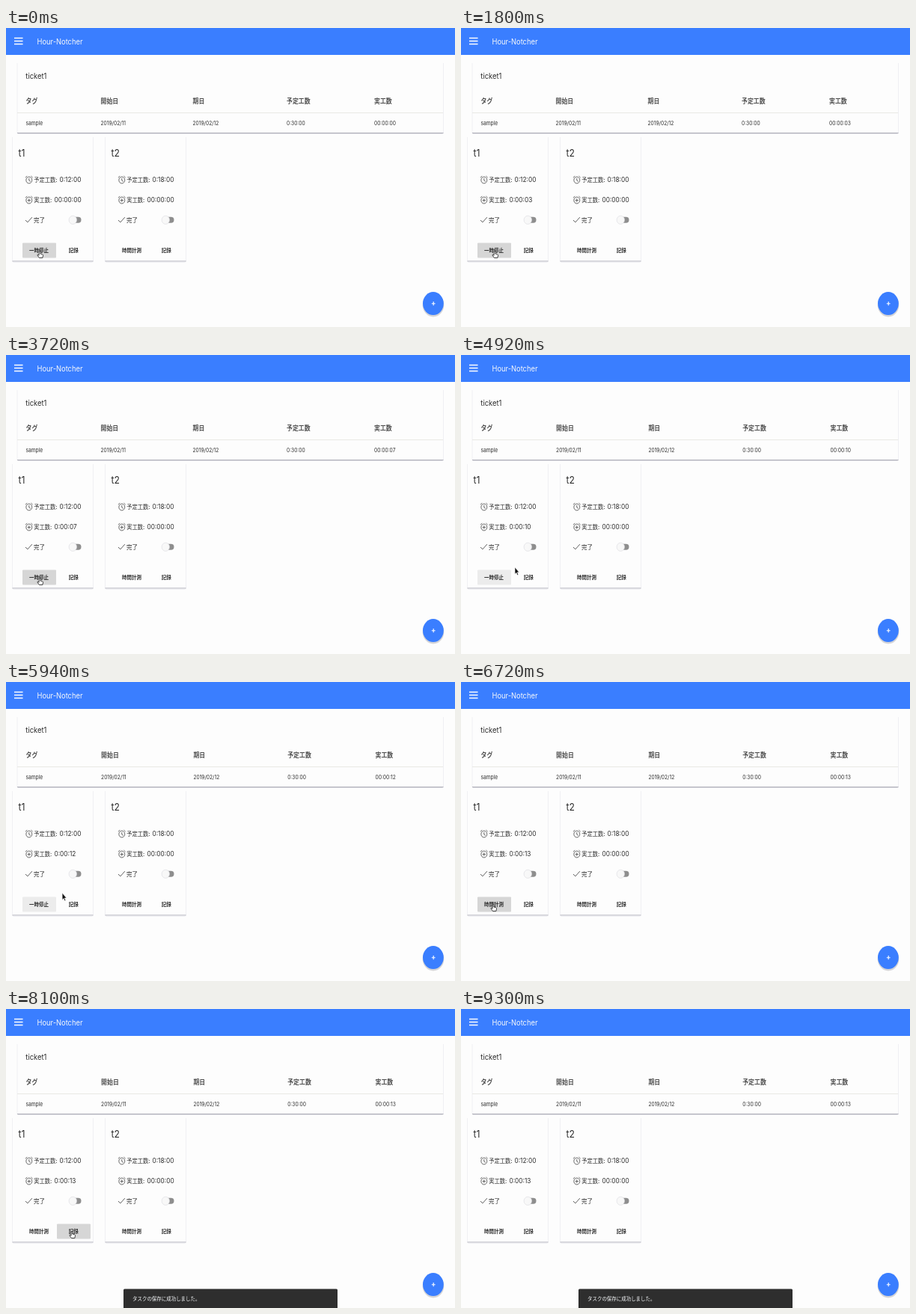
An HTML page that plays this animation: 600x400 px, repeating every 9360 ms.

```html
<!DOCTYPE html>
<html lang="ja">
<head>
<meta charset="utf-8">
<title>Hour-Notcher</title>
<style>
  html, body { margin: 0; width: 100%; height: 100%; overflow: hidden; background: #fdfdfd; }
  svg { display: block; width: 100vw; height: 100vh; }
  text { font-family: Inter, "Noto Sans CJK JP", "Noto Sans CJK", sans-serif; fill: #2e2e2e; }
  .head { fill: #505050; font-weight: 700; }
  .medium { font-weight: 500; }
  .light { fill: #f6f8fa; }
  .bold { font-weight: 700; }
  .icon { fill: none; stroke: #585858; stroke-width: .95; }
</style>
</head>
<body>
<svg id="stage" viewBox="0 0 600 400" preserveAspectRatio="none"></svg>
<script>
const LOOP = 9360, TICK = 60;
const SQUEEZE = 0.9; // the whole interface is shown slightly narrowed
const COUNT_FROM = -60, SECOND = 490; // the clock runs at about double speed
const PAUSE_AT = 6480, SAVE_AT = 7740, SNACK_AT = 7920, BLUR_AT = 9240;
const COLUMNS = [[26.5, 0], [126.5, .6], [249.5, .9], [375, 1.2], [492, 1.5]];
const HEADS = ['タグ', '開始日', '期日', '予定工数', '実工数'];
const CELLS = ['sample', '2019/02/11', '2019/02/12', '0:30:00', '00:00:00'];
const BUTTONS = [{ id: 'track', x: 22 }, { id: 'save', x: 68 }];
const BUTTON = { y: 287.5, w: 45, h: 20 };

// Pointer tip: time, x, y
const PATH = [
  [0, 45, 298], [4740, 45, 298], [4980, 77, 281.4], [5880, 77, 281.4],
  [6300, 43, 297], [6900, 43, 297], [7440, 88, 297],
  [8340, 88, 297], [9240, 578, -14], [LOOP, 578, -14]
];

const place = (x, y) => `translate(${x} ${y}) scale(${SQUEEZE} 1)`;
const text = (x, y, size, label, cls = '', id = '') =>
  `<text id="${id}" class="${cls}" font-size="${size}" transform="${place(x, y)}">${label}</text>`;

const card = (x, y, w, h) => `
  <path d="M${x} ${y}v${h}M${x + w} ${y}v${h}" stroke="#ececf0" stroke-width=".8"/>
  <path d="M${x} ${y + h}h${w}" stroke="#a9a9b4"/>
  <path d="M${x + 1} ${y + h + 1}h${w - 2}" stroke="#e6e6ea"/>`;

const alarm = (x, y, hands) => `
  <g class="icon" transform="${place(x, y)}">
    <circle r="4.4" cy=".5"/>
    <path d="M-5.4-2.8l2.5-2.2M5.4-2.8l-2.5-2.2M${hands}"/>
  </g>`;

const taskCard = (x, name, plan, prefix, button) => `
  ${card(x, 146, 108, 166)}
  ${text(x + 8, 172, 13.5, name)}
  ${alarm(x + 22.3, 203, '0-2v3l2.3 1.4')}
  ${text(x + 28.7, 206, 8.1, '予定工数:', 'medium')}
  ${text(x + 63, 206.2, 9.2, plan)}
  ${alarm(x + 22.3, 230, '-2.3 .5h4.6M0-1.8v4.6')}
  ${text(x + 28.7, 233, 8.1, '実工数:', 'medium')}
  ${text(x + 56, 233.2, 9.2, '00:00:00', '', prefix + 'Actual')}
  <path class="icon" d="M${x + 17.5} 257l2.8 3 6-6.8"/>
  ${text(x + 28.5, 259.8, 8.3, '完了', 'medium')}
  <rect x="${x + 77}" y="252.8" width="15" height="8" rx="4" fill="#8e8e8e"/>
  <ellipse cx="${x + 80.8}" cy="256.8" rx="5.2" ry="5.6" fill="#f8f8f8" stroke="#dedee2" stroke-width=".7"/>
  ${text(x + 22.5, 300.2, 7.2, button, 'bold', prefix + 'Label')}
  ${text(x + 75.2, 300.2, 7.2, '記録', 'bold')}`;

const $ = id => document.getElementById(id);

$('stage').innerHTML = `
  <rect width="600" height="400" fill="#fdfdfd"/>
  <rect width="600" height="36" fill="#3a7eff"/>
  <path d="M11 13.5h11.5M11 17.5h11.5M11 21.5h11.5" stroke="#fff" stroke-width="1.7"/>
  ${text(41.5, 21.7, 10.4, 'Hour-Notcher', 'light')}
  ${card(15, 47, 569.5, 93.5)}
  ${text(26.3, 68.3, 10.5, 'ticket1')}
  <path d="M15 113.5h569" stroke="#e9e9e4"/>
  ${HEADS.map((label, i) => text(COLUMNS[i][0], 101.2, 8.8, label, 'head', 'head' + i)).join('')}
  ${CELLS.map((label, i) => text(COLUMNS[i][0], 129.8, 7.4, label, '', 'cell' + i)).join('')}
  ${taskCard(8.5, 't1', '0:12:00', 'first', '一時停止')}
  ${taskCard(132.5, 't2', '0:18:00', 'second', '時間計測')}
  <ellipse cx="571" cy="370.6" rx="14.3" ry="15.8" fill="#c4c4c8" opacity=".7"/>
  <ellipse cx="570.9" cy="368.6" rx="13.9" ry="15.5" fill="#3a7eff"/>
  <path d="M568.8 368.7h4.8M571.2 366.1v5.2" stroke="#fff" stroke-width="1.1"/>
  <g id="snack">
    <rect x="157" y="374.5" width="286" height="28" rx="1.5" fill="#2e2e2e"/>
    ${text(169, 390.2, 7.2, 'タスクの保存に成功しました。', 'light')}
  </g>
  <g id="pointer" stroke-linejoin="round">
    <path id="arrow" d="M0 0v9.2l2.1-1.9 1.5 3.3 1.5-.7-1.4-3.2h2.7z" fill="#111" stroke="#fff" stroke-width=".6"/>
    <path id="hand" d="M-1 .7Q0-.6 1 .7V4l3.2.8q1 .4.8 1.5L4.3 9.5H-.6L-3.4 6q0-1.2 1.2-.7L-1 6.2z"
      fill="#fff" stroke="#222" stroke-width=".9"/>
  </g>`;

// Button backgrounds belong under the labels of the first card.
for (const { id, x } of BUTTONS) {
  $('firstLabel').insertAdjacentHTML('beforebegin',
    `<rect id="${id}" x="${x}" y="${BUTTON.y}" width="${BUTTON.w}" height="${BUTTON.h}" rx="1"/>`);
}

function pointerAt(t) {
  const i = PATH.findIndex(([end]) => end > t);
  const [t0, x0, y0] = PATH[i - 1], [t1, x1, y1] = PATH[i];
  const p = (t - t0) / (t1 - t0), ease = p * p * (3 - 2 * p);
  return [x0 + (x1 - x0) * ease, y0 + (y1 - y0) * ease];
}

function render(t) {
  const seconds = Math.min(13, Math.floor((t - COUNT_FROM) / SECOND));
  const clock = '0:00:' + String(seconds).padStart(2, '0');
  $('cell4').textContent = '0' + clock;
  $('firstActual').textContent = seconds ? clock : '00:00:00';
  $('firstLabel').textContent = t < PAUSE_AT ? '一時停止' : '時間計測';

  // Narrow ones shrink the last column and push the others right.
  const ones = clock.split('1').length - 1;
  COLUMNS.forEach(([x, shift], i) => {
    const left = x + shift * ones;
    $('head' + i).setAttribute('transform', place(left, 101.2));
    $('cell' + i).setAttribute('transform', place(left, 129.8));
  });

  const [x, y] = pointerAt(t);
  const focused = t < SAVE_AT ? 'track' : t < BLUR_AT ? 'save' : '';
  let overButton = false;
  for (const button of BUTTONS) {
    const hover = x > button.x && x < button.x + BUTTON.w && y > BUTTON.y && y < BUTTON.y + BUTTON.h;
    $(button.id).setAttribute('fill', hover ? '#d6d6d6' : button.id === focused ? '#ececec' : 'none');
    overButton = overButton || hover;
  }
  $('pointer').setAttribute('transform', place(x, y));
  $('hand').style.display = overButton ? '' : 'none';
  $('arrow').style.display = overButton ? 'none' : '';

  const rise = Math.max(0, Math.min(1, (t - SNACK_AT) / 120));
  $('snack').setAttribute('transform', `translate(0 ${28 * (1 - rise) ** 2})`);
}

const start = performance.now();
function frame() {
  const t = (performance.now() - start) % LOOP;
  render(Math.floor(t / TICK) * TICK);
  requestAnimationFrame(frame);
}
frame();
</script>
</body>
</html>
```
